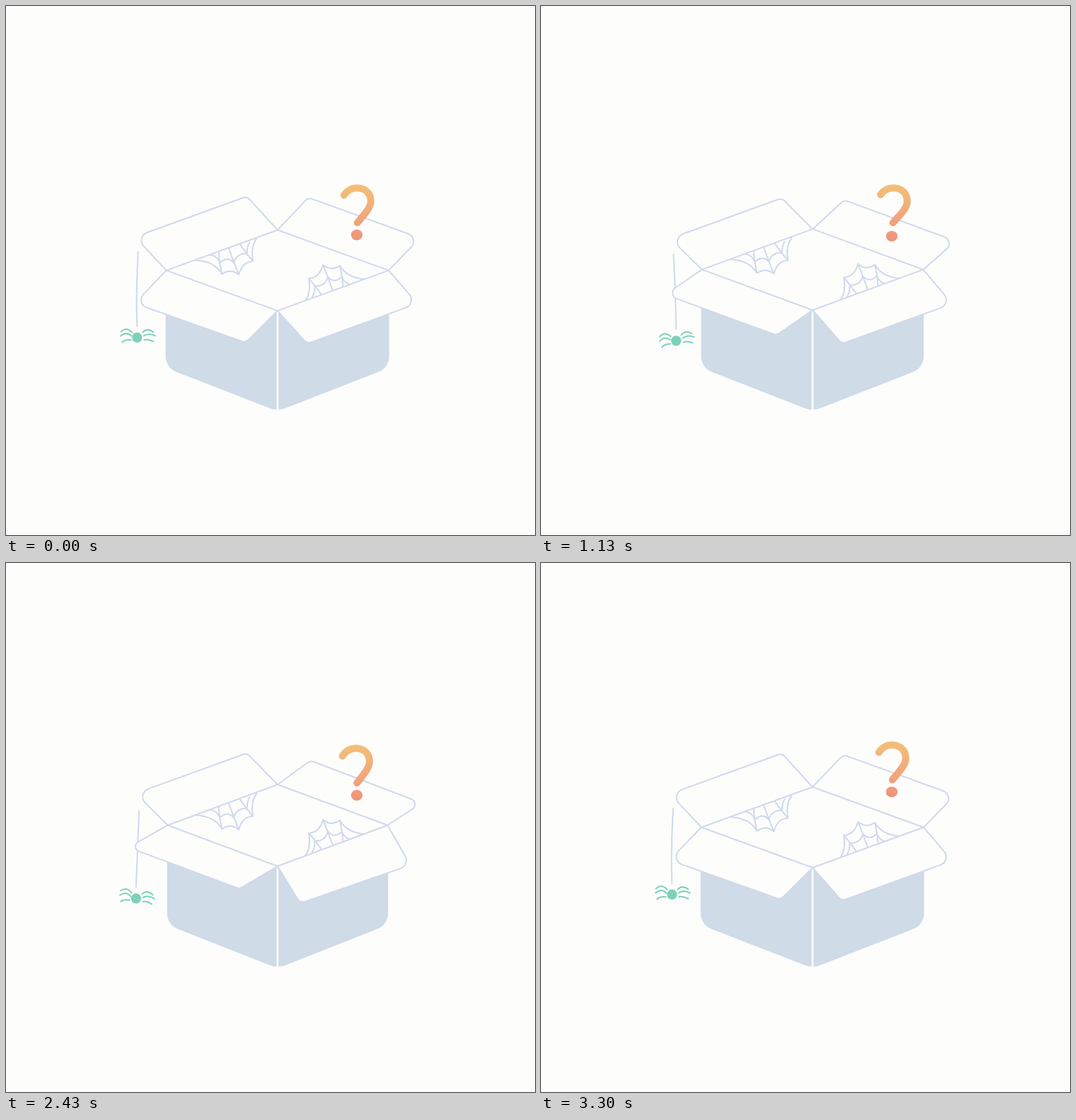
Write an HTML page with a canvas that moves like this. It is 748 by 748 pixels and loops after 3330 ms.

```html
<!DOCTYPE html>
<html lang="en">
<head>
<meta charset="utf-8">
<title>Empty box</title>
<style>
  html, body { margin: 0; width: 100%; height: 100%; overflow: hidden; background: #fdfdfc; }
  canvas { display: block; width: 748px; height: 748px; }
</style>
</head>
<body>
<canvas id="stage" width="748" height="748"></canvas>
<script>
const ctx = document.getElementById('stage').getContext('2d');
const LOOP = 3330;
const PAPER = '#fdfdfc', LINE = '#d0d9eb', CARD = '#cfdbe6', GREEN = '#7dd1b9';

// One swing per loop: 1 at the peak time, -1 half a loop later.
const swing = (t, peak) => Math.cos((t - peak) / LOOP * Math.PI * 2);

// Corners are [x, y, radius]; a missing radius gives a sharp corner.
function polygon(points) {
  ctx.beginPath();
  ctx.moveTo(points[0][0], points[0][1]);
  for (let i = 1; i < points.length; i++) {
    const [x, y, r] = points[i];
    const next = points[(i + 1) % points.length];
    if (r) ctx.arcTo(x, y, next[0], next[1], r);
    else ctx.lineTo(x, y);
  }
  ctx.closePath();
}

function flap(points) {
  polygon(points);
  ctx.fillStyle = PAPER;
  ctx.fill();
  ctx.strokeStyle = LINE;
  ctx.lineWidth = 2;
  ctx.stroke();
}

// Quadratic curve passing through the middle point.
function bow(x0, y0, mx, my, x1, y1) {
  ctx.moveTo(x0, y0);
  ctx.quadraticCurveTo(2 * mx - (x0 + x1) / 2, 2 * my - (y0 + y1) / 2, x1, y1);
}

function web(dx, dy, angle) {
  ctx.save();
  ctx.translate(dx, dy);
  ctx.rotate(angle);
  ctx.strokeStyle = LINE;
  ctx.lineWidth = 2;
  ctx.beginPath();
  // outer edge
  bow(-121, -13.5, -98, -8, -83.5, 6);
  bow(-83.5, 6, -71, 2, -59.5, 7);
  bow(-59.5, 7, -52, -7, -39.5, -12);
  bow(-39.5, -12, -40, -30, -34.5, -44);
  // inner edge
  bow(-100, -21, -92, -18, -86, -10);
  bow(-86, -10, -76, -15, -66.5, -10);
  bow(-66.5, -10, -60, -20, -48, -23);
  bow(-48, -23, -47, -32, -44, -39);
  // spokes
  bow(-88, -26, -86.5, -10, -83.5, 6);
  bow(-74, -31, -67, -12, -59.5, 7);
  bow(-58, -36, -48.5, -23, -39.5, -12);
  ctx.stroke();
  ctx.restore();
}

function thread(t, spiderX, spiderY) {
  ctx.strokeStyle = LINE;
  ctx.lineWidth = 2;
  ctx.beginPath();
  ctx.moveTo(187.5 - 0.9 * swing(t, 385), 349.8 + 2.4 * swing(t, 1700));
  ctx.quadraticCurveTo(187 + 4 * swing(t, 1400), 412, spiderX, spiderY - 16);
  ctx.stroke();
}

function spider(t, x, y) {
  ctx.save();
  ctx.translate(x, y);
  ctx.rotate(-0.12 * swing(t, 880));
  ctx.fillStyle = ctx.strokeStyle = GREEN;
  ctx.lineWidth = 2;
  ctx.beginPath();
  ctx.arc(0, 0, 7.2, 0, Math.PI * 2);
  ctx.fill();
  ctx.beginPath();
  bow(-22.8, -8.2, -15, -11.5, -7, -7);
  bow(-23.2, -1.9, -15.5, -5.5, -8, -2);
  bow(-21, 7, -16, 4, -8.8, 3.5);
  bow(8, -7.5, 15, -11, 23, -7.7);
  bow(9.5, -2.5, 17, -5, 25.5, -2.7);
  bow(10, 3.3, 16, 3, 23, 5.5);
  ctx.stroke();
  ctx.restore();
}

function question(t) {
  ctx.save();
  ctx.translate(496, 326 - 3.2 * swing(t, 385));
  const shade = ctx.createLinearGradient(0, -70, 0, 5);
  shade.addColorStop(0, '#f3bf78');
  shade.addColorStop(0.6, '#f1a67a');
  shade.addColorStop(1, '#ef947c');
  ctx.fillStyle = ctx.strokeStyle = shade;
  ctx.beginPath();
  ctx.ellipse(0, 0, 8.2, 7.6, 0, 0, Math.PI * 2);
  ctx.fill();
  ctx.rotate(0.042 * swing(t, 870));
  ctx.translate(0, -0.5 - 1.1 * swing(t, 1250));
  ctx.lineWidth = 10;
  ctx.beginPath();
  ctx.moveTo(-18, -56.5);
  ctx.bezierCurveTo(-9, -70, 11, -70, 18, -57);
  ctx.bezierCurveTo(23, -46, 18, -38, 11, -29.5);
  ctx.lineTo(1, -17.5);
  ctx.stroke();
  ctx.restore();
}

function draw(t) {
  const sway = swing(t, 385);
  const leftFold = swing(t, 250);
  const rightFold = swing(t, 550);
  const rearFold = swing(t, 1100);

  const left = [227.7 - 1.4 * sway, 372.3 + 2.1 * sway];
  const right = [540.3 + sway, 372.3 + 2.1 * sway];
  const back = [384, 315 + 2.4 * sway];
  const front = [384, 429.8 + 1.4 * sway];

  ctx.fillStyle = PAPER;
  ctx.fillRect(0, 0, 748, 748);
  ctx.lineCap = ctx.lineJoin = 'round';

  const spiderX = 187.2 + 4 * swing(t, 1080);
  const spiderY = 472.5 + 4 * swing(t, 1850);
  thread(t, spiderX, spiderY);

  flap([back,
    [340.6, 270 + 1.6 * rearFold, 9],
    [183 - 0.6 * sway, 327.2 + 1.6 * rearFold, 12],
    left]);
  flap([back,
    [429 - 2 * sway, 275.1 - 5.6 * sway, 9],
    [586.6 - 1.7 * sway, 333.7 - 7.6 * sway, 9.8 + 2.3 * sway],
    right]);

  web(388.7, 371.5 + 1.9 * sway, 0);
  web(388.7, 371.5 + 2.1 * sway, Math.PI);

  polygon([front, [left[0] - 1, left[1] + 20], [left[0] - 1, 511.5, 24],
    [384, 573, 32], [right[0] + 0.7, 511.5, 24], [right[0] + 0.7, right[1] + 20]]);
  ctx.fillStyle = CARD;
  ctx.fill();
  ctx.strokeStyle = PAPER;
  ctx.lineWidth = 2.6;
  ctx.beginPath();
  ctx.moveTo(...front);
  ctx.lineTo(384, 572);
  ctx.stroke();

  flap([left,
    [176.6 + 6.1 * leftFold, 409.2 + 12.6 * leftFold, 9 + 3 * leftFold],
    [333.6 + 6.1 * leftFold, 466.6 + 10.6 * leftFold, 9],
    front]);
  flap([right,
    [578 + 7 * rightFold, 423 - 4.5 * rightFold, 12],
    [422.3 + 7 * rightFold, 478.8 - 2.5 * rightFold, 9],
    front]);

  question(t);
  spider(t, spiderX, spiderY);
}

const start = performance.now();
function tick() {
  draw((performance.now() - start) % LOOP);
  requestAnimationFrame(tick);
}
tick();
</script>
</body>
</html>
```
